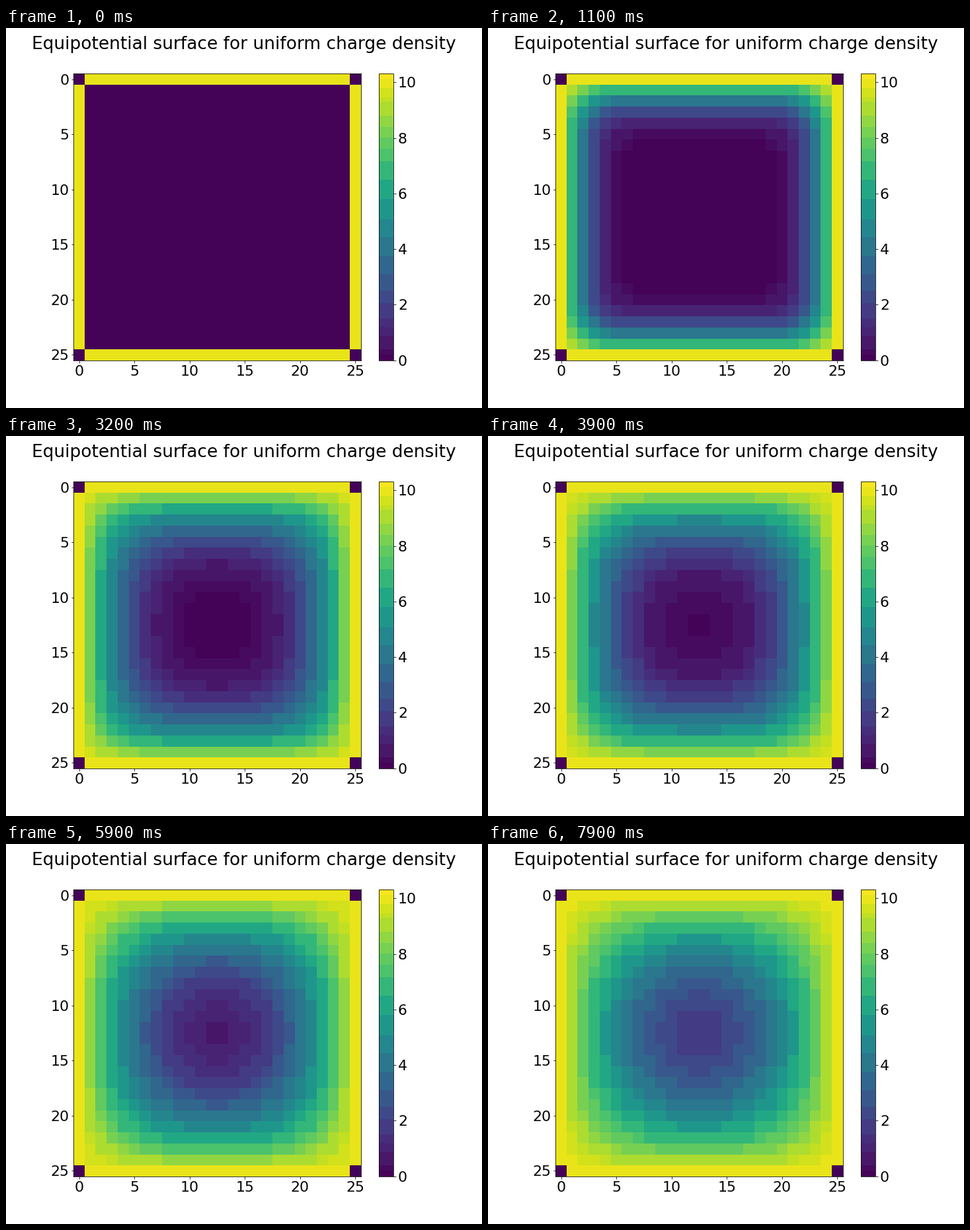
A matplotlib script for the animation above (8000 ms loop, 720x576 px).

```python
import numpy as np
import matplotlib.pyplot as plt
from matplotlib.animation import FuncAnimation
from matplotlib.colors import ListedColormap

W, H, DPI = 720, 576, 72
SIZE, CHARGE, VMAX = 26, 10.0, 10.31
FRAMES, INTERVAL = 80, 100

plt.rcParams.update({"font.family": "DejaVu Sans", "font.size": 22})


def banded_viridis(edges, n=1024):
    """Viridis reduced to one flat colour per band."""
    edges = np.array(edges)
    mids = (edges[:-1] + edges[1:]) / 2
    values = (np.arange(n) + 0.5) / n * VMAX
    band = np.digitize(values, edges[1:-1])
    return ListedColormap(plt.get_cmap("viridis")(mids[band] / VMAX))


def relax(steps):
    """Potential after each Jacobi sweep, edges held at a fixed charge."""
    u = np.zeros((SIZE, SIZE))
    u[[0, -1], 1:-1] = CHARGE
    u[1:-1, [0, -1]] = CHARGE
    states = [u]
    for _ in range(steps - 1):
        nxt = u.copy()
        nxt[1:-1, 1:-1] = (u[:-2, 1:-1] + u[2:, 1:-1]
                           + u[1:-1, :-2] + u[1:-1, 2:]) / 4
        states.append(nxt)
        u = nxt
    return states


def add_axes(fig, left, top, width, height):
    return fig.add_axes([left / W, 1 - (top + height) / H, width / W, height / H])


cmap = banded_viridis([0, 0.2, 0.4, 0.88, 1.2, 1.5, 2.06, 2.5, 3.1, 3.74, 4.43,
                       5.07, 5.8, 6.5, 7.16, 7.6, 8.0, 8.4, 8.8, 9.3,
                       9.45, 9.8, 10.13, VMAX])
states = relax(FRAMES)

fig = plt.figure(figsize=(W / DPI, H / DPI), dpi=DPI, facecolor="white")
fig.suptitle("Equipotential surface for uniform charge density")
ax = add_axes(fig, 102.4, 69.3, 434.3, 434.3)
image = ax.imshow(states[0], cmap=cmap, vmin=0, vmax=VMAX,
                  interpolation="nearest", aspect="auto")
ax.set_xticks(range(0, SIZE, 5))
ax.set_yticks(range(0, SIZE, 5))

bar = fig.colorbar(image, cax=add_axes(fig, 564.3, 69.3, 21.7, 434.3))
bar.set_ticks(range(0, 11, 2))


def update(i):
    image.set_data(states[i])
    return (image,)


anim = FuncAnimation(fig, update, frames=FRAMES, interval=INTERVAL,
                     repeat=True, repeat_delay=0)
plt.show()
```
